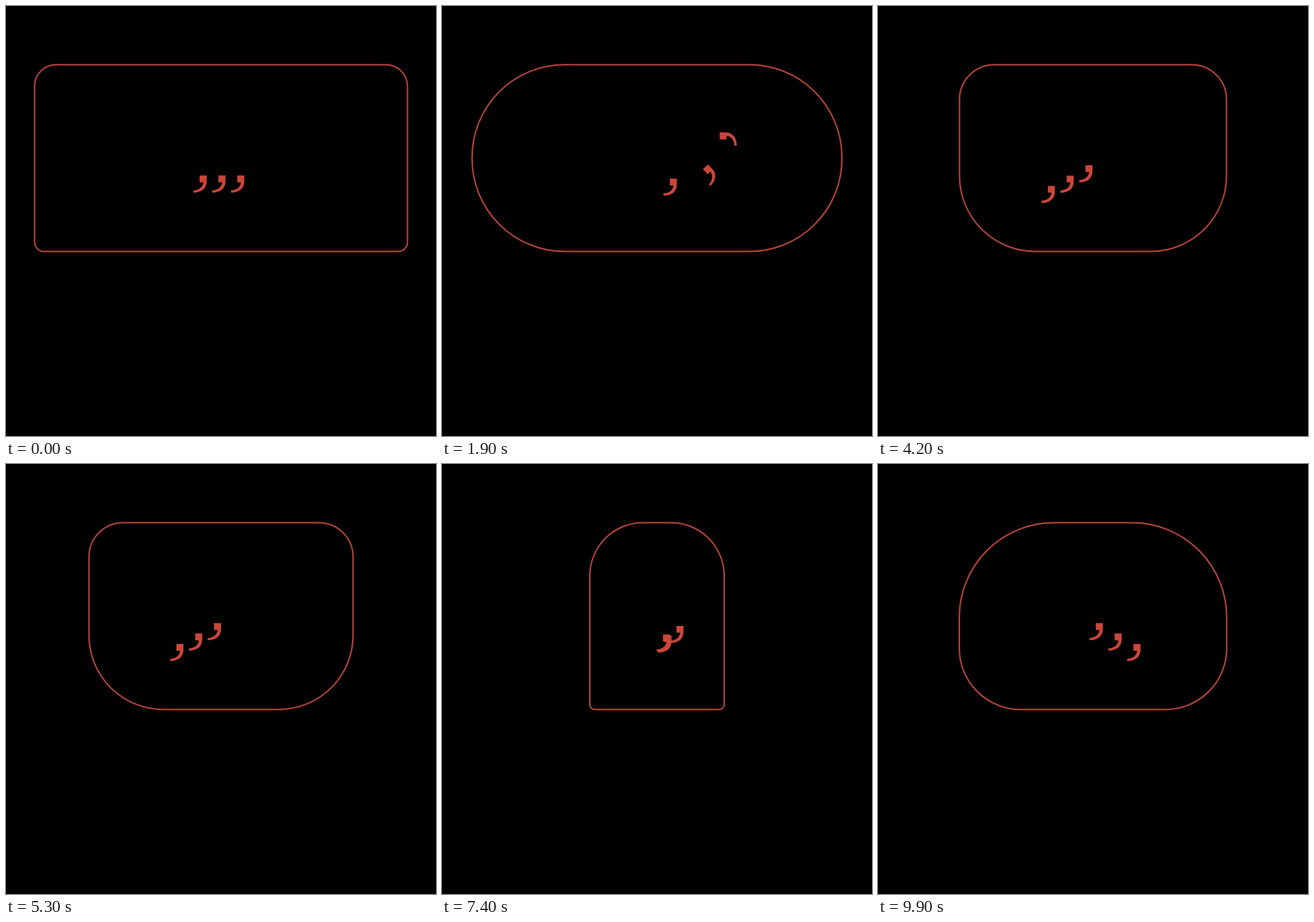
These frames come from a looping animation (640x640 px, 10000 ms). An HTML page with a canvas:

```html
<!DOCTYPE html>
<html lang="en">
<head>
<meta charset="utf-8">
<title>Speech bubble</title>
<style>
html, body { margin: 0; width: 100%; height: 100%; overflow: hidden; background: #000; }
canvas { display: block; }
</style>
</head>
<body>
<canvas id="stage" width="640" height="640"></canvas>
<script>
const ctx = document.getElementById('stage').getContext('2d');
const LOOP = 10000, STEP = LOOP / 6, DELAY = 17, DURATION = 1000;
const TOP = 87.3, HEIGHT = 278;

// Each comma is [angle, x, y]: turned about the pivot, then moved outwards.
const row = (shift, slope) => [-1, 0, 1].map(i => [0, -3.3 + shift + i * 28, 39 + i * slope]);
const arc = (first, x, y) => [0, 1, 2].map(i => [first - 45 * i, x, y]);

const poses = [
  { width: 555, radii: [32, 14], pivot: [320, 226], commas: row(0, 0) },
  { width: 553.5, radii: [139, 139], pivot: [347.4, 190.3], commas: arc(0, -7, 79) },
  { width: 245, radii: [18, 10], pivot: [320, 224], commas: arc(45, -3.3, 76) },
  { width: 398, radii: [52, 113], pivot: [320, 226], commas: row(-35.5, -15.5) },
  { width: 198.5, radii: [3.5, 9], pivot: [320, 226], commas: row(0.7, -15.5) },
  { width: 200, radii: [81, 7], pivot: [320, 226], commas: [[0, 31, 27], [0, 12, 42], [0, 19, 41]] },
  { width: 398, radii: [141, 91], pivot: [320, 226], commas: row(36, 15.5) }
];
poses[5].commas[2][1] = 9;

const commaShape = new Path2D('M-.5-12.7H10V-4C10 6 3 12.8-9.8 12.8V9.4C-2 9 4.2 5 5-2.6H-.5Z');

function easeInOutExpo(p) {
  if (p <= 0) return 0;
  if (p >= 1) return 1;
  return p < 0.5 ? 2 ** (20 * p - 11) : 1 - 2 ** (9 - 20 * p);
}

function mix(a, b, p) {
  return Array.isArray(a) ? a.map((v, i) => mix(v, b[i], p)) : a + (b - a) * p;
}

function drawBubble(width, [top, bottom]) {
  ctx.beginPath();
  ctx.roundRect(320 - width / 2, TOP, width, HEIGHT, [top, top, bottom, bottom]);
  ctx.strokeStyle = '#b3423b';
  ctx.lineWidth = 2.2;
  ctx.stroke();
}

function drawComma(pivot, [angle, x, y]) {
  ctx.save();
  ctx.translate(...pivot);
  ctx.rotate(angle * Math.PI / 180);
  ctx.translate(x, y);
  ctx.fillStyle = '#cb463a';
  ctx.fill(commaShape);
  ctx.restore();
}

function draw(now) {
  const time = now % LOOP;
  const step = Math.floor(time / STEP);
  const p = easeInOutExpo((time - step * STEP - DELAY) / DURATION);
  const from = poses[step], to = poses[step + 1];
  const pivot = mix(from.pivot, to.pivot, p);

  ctx.clearRect(0, 0, 640, 640);
  drawBubble(mix(from.width, to.width, p), mix(from.radii, to.radii, p));
  mix(from.commas, to.commas, p).forEach(comma => drawComma(pivot, comma));
}

const start = performance.now();
function tick() {
  draw(performance.now() - start);
  requestAnimationFrame(tick);
}
tick();
</script>
</body>
</html>
```
